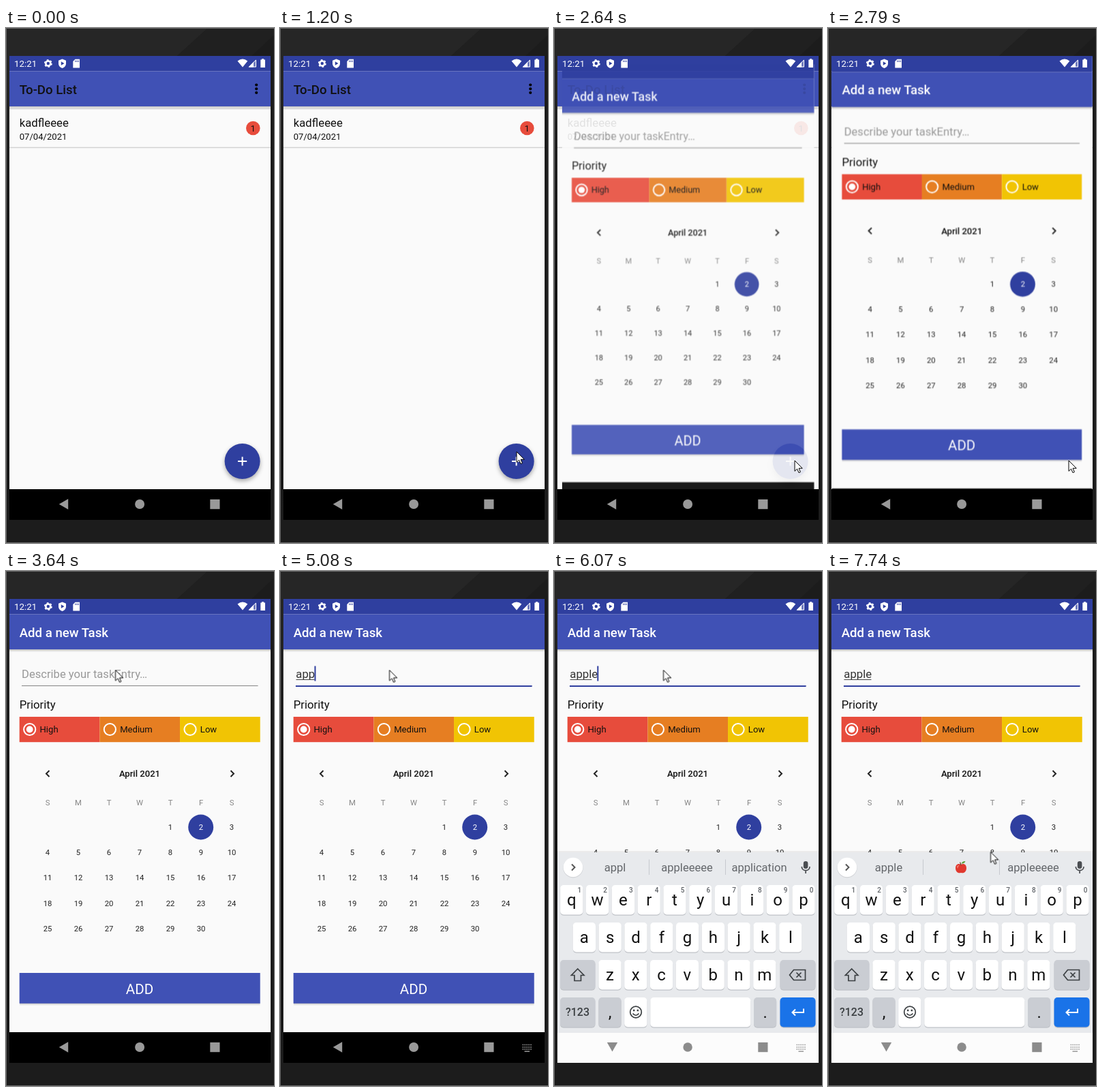
These frames come from a looping animation (393x756 px, 7990 ms). An HTML page:

```html
<!DOCTYPE html>
<html lang="en">
<head>
<meta charset="utf-8">
<title>To-Do List</title>
<style>
html, body { margin: 0; width: 100%; height: 100%; overflow: hidden; background: #1c1c1c; }
svg { display: block; width: 100vw; height: 100vh; }
text { font-family: Roboto, "Noto Sans", sans-serif; font-size: 16.75px; fill: #111; white-space: pre; }
.title { font-size: 18.64px; font-weight: 500; }
.small { font-size: 13.1px; }
.mid { text-anchor: middle; }
.white { fill: #fff; }
.day text { font-size: 11.3px; fill: #222; text-anchor: middle; }
.day .week { fill: #858585; }
.day .picked { fill: #fff; }
.sug text { font-size: 16.5px; fill: #63666a; text-anchor: middle; }
.key text { font-size: 24px; text-anchor: middle; }
.key .num { font-size: 10px; font-weight: 500; fill: #5f6368; }
.line { fill: none; stroke: #222; stroke-width: 2; }

/* one shared clock, hard steps */
.go { animation: 7.99s step-end infinite; }
#mouse { animation-name: mouse; }
#fab { animation-name: fab; }
#fabShade { animation-name: shade; }
#page { animation-name: page; transform-origin: 196.5px 381.5px; }
#focus { animation-name: focus; }
#hint { animation-name: hint; }
#kbdIcon { animation-name: icon; }
#edge { animation-name: edge; }
#caret { animation-name: caret; }
#under { animation-name: under; transform-origin: 23.5px 0; }
#board { animation-name: board; }
#sugA { animation-name: sugA; }
#sugB { animation-name: sugB; }

@keyframes mouse {
  0% { transform: translate(380px, -40px); }
  3.25% { transform: translate(380px, 17px); }
  4.93% { transform: translate(340px, 80px); }
  6.62% { transform: translate(303px, 170px); }
  8.29% { transform: translate(281px, 270px); }
  9.97% { transform: translate(285px, 375px); }
  11.65% { transform: translate(307px, 475px); }
  13.34% { transform: translate(333px, 565px); }
  15.01% { transform: translate(347px, 622px); }
  16.89% { transform: translate(353px, 635px); }
  36.79% { transform: translate(345px, 600px); }
  38.54% { transform: translate(300px, 480px); }
  40.3% { transform: translate(242px, 330px); }
  42.05% { transform: translate(195px, 220px); }
  43.8% { transform: translate(168px, 160px); }
  45.55% { transform: translate(160.5px, 145.5px); }
  83.22% { transform: translate(163px, 152px); }
  84.9% { transform: translate(174px, 185px); }
  86.59% { transform: translate(190px, 235px); }
  88.27% { transform: translate(207px, 290px); }
  89.95% { transform: translate(222px, 345px); }
  91.62% { transform: translate(231px, 385px); }
  93.31% { transform: translate(235px, 406px); }
  94.99% { transform: translate(236px, 412px); }
  96.87%, 100% { transform: translate(238.5px, 412.5px); }
}
@keyframes fab {
  0% { fill: #2f3f9f; }
  20.4% { fill: #3d4ca5; }
  21.9% { fill: #4a58ac; }
  29.66%, 100% { fill: #2f3f9f; }
}
@keyframes shade {
  0% { filter: drop-shadow(0 3px 3px #0005); }
  20.4% { filter: drop-shadow(0 5px 4px #0005); }
  21.9%, 100% { filter: drop-shadow(0 6px 5px #0005); }
}
@keyframes page {
  0% { opacity: 0; transform: scale(.9); }
  33.04% { opacity: .9; transform: scale(.965); }
  34.91% { opacity: 1; transform: scale(.9965); }
  36.79%, 100% { opacity: 1; transform: none; }
}
@keyframes focus { 0% { opacity: 0; } 52.81%, 100% { opacity: 1; } }
@keyframes hint { 0% { opacity: 1; } 60.07%, 100% { opacity: 0; } }
@keyframes icon { 0% { opacity: 0; } 58.32%, 100% { opacity: 1; } }
@keyframes edge {
  0% { transform: translateX(24px); }
  60.07% { transform: translateX(32.7px); }
  61.7% { transform: translateX(42.1px); }
  63.57% { transform: translateX(51.5px); }
  66.95% { transform: translateX(55.7px); }
  75.97%, 100% { transform: translateX(64.3px); }
}
@keyframes caret {
  0% { opacity: 0; }
  52.81% { opacity: 1; }
  83.22% { opacity: 0; }
  89.95% { opacity: 1; }
  96.87%, 100% { opacity: 0; }
}
@keyframes under {
  0% { transform: scaleX(0); }
  60.07% { transform: scaleX(.22); }
  61.7% { transform: scaleX(.45); }
  63.57% { transform: scaleX(.68); }
  66.95% { transform: scaleX(.8); }
  77.84%, 100% { transform: none; }
}
@keyframes board {
  0% { transform: translateY(312px); }
  65.33% { transform: translateY(180px); }
  66.95% { transform: translateY(60px); }
  68.58% { transform: translateY(12px); }
  70.33%, 100% { transform: none; }
}
@keyframes sugA { 0% { opacity: 1; } 77.84%, 100% { opacity: 0; } }
@keyframes sugB { 0% { opacity: 0; } 77.84%, 100% { opacity: 1; } }
</style>
</head>
<body>
<svg viewBox="0 0 393 756">
  <defs>
    <clipPath id="screen"><path d="M5 41H388V722H5Z"/></clipPath>
    <linearGradient id="fade" x2="0" y2="1">
      <stop stop-color="#000" stop-opacity=".24"/><stop offset="1" stop-color="#000" stop-opacity="0"/>
    </linearGradient>
    <linearGradient id="side" x2="0" y2="1">
      <stop stop-color="#262626"/><stop offset=".6" stop-color="#101010"/><stop offset="1" stop-color="#1c1c1c"/>
    </linearGradient>
    <g id="bars">
      <path fill="#2f3f9f" d="M5 41H388V63.5H5Z"/>
      <path fill="#4051b5" d="M5 63.5H388V115H5Z"/>
      <path fill="url(#fade)" d="M5 115H388V119H5Z"/>
    </g>
    <g id="dots">
      <path d="M355.500 695.500H369M355.500 699H369M355.500 702H369" stroke="#999" stroke-width="1.700" stroke-dasharray="1.700 1.200"/>
      <path d="M358.500 705.200H366" stroke="#999" stroke-width="1.500"/>
    </g>
  </defs>

  <!-- emulator frame -->
  <path fill="#1c1c1c" d="M0 0H393V756H0Z"/>
  <path fill="#262626" d="M0 0H296L251 41H0Z"/>
  <path fill="#202020" d="M296 0H393V10L360 41H251Z"/>
  <path fill="url(#side)" d="M0 41H5V722H0Z"/>
  <path fill="none" stroke="#666" d="M.5 756V.5H393M0 755.500H393"/>

  <g clip-path="url(#screen)">
    <!-- task list -->
    <path fill="#fafafa" d="M5 41H388V677H5Z"/>
    <use href="#bars"/>
    <path d="M5 118.500H388M5 175.500H388" stroke="#d2d2d2" stroke-width="1.300"/>
    <text class="title" x="19.700" y="96.500">To-Do List</text>
    <g><circle cx="367.200" cy="83.500" r="2.100"/><circle cx="367.200" cy="89.300" r="2.100"/><circle cx="367.200" cy="95" r="2.100"/></g>
    <text x="19.700" y="145">kadfleeee</text>
    <text class="small" x="19.700" y="163.500">07/04/2021</text>
    <circle cx="362.300" cy="147" r="10.300" fill="#e74c3c"/>
    <text class="small mid" x="362.300" y="151.700">1</text>
    <g id="fabShade" class="go"><circle id="fab" class="go" cx="346.600" cy="636" r="26"/></g>
    <path d="M340 636H353.200M346.600 629.400V642.600" stroke="#fff" stroke-width="2"/>
    <path d="M5 677H388V722H5Z"/>

    <!-- new task -->
    <g id="page" class="go">
      <path fill="#fafafa" d="M5 41H388V677H5Z"/>
      <use href="#bars"/>
      <path d="M5 677H388V722H5Z"/>
      <text class="title white" x="19.700" y="96.500">Add a new Task</text>
      <path d="M23 168.500H369.500" stroke="#858585"/>
      <text x="23.300" y="157" style="fill:#333">apple</text>
      <path id="under" class="go" d="M23.500 159.500H63.500" stroke="#444"/>
      <g id="edge" class="go">
        <path fill="#fafafa" d="M0 138H50V162H0Z"/>
        <path id="caret" class="go" fill="#303f9f" d="M-1 139.500H1V161.500H-1Z"/>
      </g>
      <path id="focus" class="go" fill="#303f9f" d="M23 168H369.500V170H23Z"/>
      <text id="hint" class="go" x="23" y="157" style="fill:#999;font-size:16.600px">Describe your taskEntry…</text>
      <text x="19.700" y="202">Priority</text>
      <g id="radios"></g>
      <path class="line" d="M63.500 293L59 297.500L63.500 302M329.500 293L334 297.500L329.500 302"/>
      <text class="small mid" x="196" y="302" font-weight="500">April 2021</text>
      <g id="days" class="day"></g>
      <path fill="url(#fade)" d="M20 634H372.500V638H20Z"/>
      <path fill="#4051b5" d="M19.700 590H372.700V634.700H19.700Z"/>
      <text class="mid white" x="196" y="621" style="font-size:20.500px">ADD</text>
    </g>

    <!-- system bars -->
    <g fill="#fff">
      <text class="white" x="12" y="56.800" style="font-size:13.300px">12:21</text>
      <g fill="none" stroke="#fff">
        <circle cx="61.800" cy="52" r="3.500" stroke-width="2.600"/>
        <circle cx="61.800" cy="52" r="4.900" stroke-width="2.200" stroke-dasharray="2.500 2.630"/>
      </g>
      <path d="M82.500 45.500L88 47.700V52C88 55.500 85.600 58 82.500 59C79.400 58 77 55.500 77 52V47.700Z"/>
      <path fill="#2f3f9f" d="M80.800 49.200L85.500 52L80.800 54.800Z"/>
      <path d="M101.500 45.800H108V58.500H98.300V49Z"/>
      <path stroke="#2f3f9f" d="M101.800 47.500V50M104 47.500V50M106.200 47.500V50"/>
      <path d="M339.500 48.500Q347 42.500 354.300 48.500L347 57.500Z"/>
      <path fill-opacity=".3" d="M367 46V57.500H355.500Z"/>
      <path d="M363 50V57.500H355.500Z"/>
      <path fill="none" stroke="#fff" d="M366.500 47V57H356.700Z"/>
      <path d="M373.300 46.500H375V45.200H378.200V46.500H380V58H373.300Z"/>
    </g>
    <g fill="#999">
      <path d="M77.800 699L91.200 691.200V706.800Z"/>
      <circle cx="196.100" cy="699" r="7"/>
      <path d="M299.300 692H313.500V706.200H299.300Z"/>
      <use id="kbdIcon" class="go" href="#dots"/>
    </g>

    <!-- keyboard -->
    <g id="board" class="go">
      <path fill="#000" fill-opacity=".06" d="M5 411H388V413H5Z"/>
      <path fill="#e8eaed" d="M5 413H388V678H5Z"/>
      <path fill="#fcfcfc" d="M5 678H388V722H5Z"/>
      <g fill="#8c8c8c">
        <path d="M77.800 692H93.200L85.500 705.500Z"/>
        <circle cx="196.100" cy="699" r="6.700"/>
        <path d="M299.300 692H313.500V706.200H299.300Z"/>
      </g>
      <use href="#dots"/>
      <circle cx="28" cy="435.800" r="14.600" fill="#cfd1d5"/>
      <circle cx="28" cy="435" r="14.300" fill="#fff"/>
      <path class="line" d="M26 430.500L30.500 435L26 439.500" style="stroke:#555"/>
      <path d="M139.500 423.500V446M251.500 423.500V446" stroke="#c6c9ce"/>
      <g class="sug">
        <g id="sugA" class="go">
          <text x="89.500" y="441">appl</text><text x="195" y="441">appleeeee</text><text x="301" y="441">application</text>
        </g>
        <g id="sugB" class="go">
          <text x="89" y="441">apple</text><text x="301" y="441">appleeeee</text>
          <path fill="#e0392f" d="M195 431C191 428.500 187 431 187 436C187 441 190.500 444.500 195 443C199.500 444.500 203 441 203 436C203 431 199 428.500 195 431Z"/>
          <path fill="#f4877c" d="M189 434Q190 431.500 192.500 432Q190.500 434 190 437Z"/>
          <path fill="none" stroke="#6b4226" stroke-width="1.300" d="M195 432Q194.500 429 193.500 427.500"/>
          <path fill="#5ea33a" d="M195.500 429.500Q197 425.500 201.500 426Q200 430 195.500 429.500Z"/>
        </g>
      </g>
      <g class="line" style="stroke:#4a4d51">
        <rect x="366.800" y="427" width="4.600" height="9" rx="2.300" fill="#4a4d51"/>
        <path d="M363.300 434C363.300 441.500 375 441.500 375 434M369.100 440V444" stroke-width="1.700"/>
      </g>
      <g id="keys" class="key"></g>
      <g class="line" style="stroke:#3c4043;stroke-width:1.700">
        <path d="M34.800 584L44 593.500H39.500V601.500H30V593.500H25.500Z"/>
        <path d="M351.500 585.500H368.500V600.500H351.500L345.500 593ZM355.500 589.500L362.500 596.500M362.500 589.500L355.500 596.500"/>
        <circle cx="120" cy="647.500" r="8.300"/>
        <path d="M115.500 649.500Q120 655 124.500 649.500"/>
        <path stroke-width="2.400" d="M116 645H118.400M121.600 645H124"/>
        <path stroke="#fff" stroke-width="2" d="M366 642.500V648H350M354 643.500L349.500 648L354 652.500"/>
      </g>
    </g>
  </g>

  <path id="mouse" class="go" fill="#fff" stroke="#000" d="M0 0V15.500L3.600 12.200L6 17.800L8.400 16.800L6.100 11.300H11.200Z"/>
</svg>
<script>
const NS = 'http://www.w3.org/2000/svg';

function add(parent, tag, attrs, text) {
  const el = document.createElementNS(NS, tag);
  for (const name in attrs) el.setAttribute(name, attrs[name]);
  if (text) el.textContent = text;
  parent.append(el);
  return el;
}

const byId = id => document.getElementById(id);

// priority choices
[['High', '#e74c3c'], ['Medium', '#e67e22'], ['Low', '#f1c404']].forEach(([name, fill], i) => {
  const g = byId('radios'), x = 19.7 + i * 117.67;
  add(g, 'rect', { x, y: 214, width: 117.67, height: 37.2, fill });
  add(g, 'circle', { cx: x + 15, cy: 232.5, r: 8.6, fill: 'none', stroke: '#fff', 'stroke-width': 2 });
  if (!i) add(g, 'circle', { cx: x + 15, cy: 232.5, r: 4.9, fill: '#fff' });
  add(g, 'text', { x: x + 29.8, y: 237.2, class: 'small' }, name);
});

// calendar: the month begins on a Thursday
const days = byId('days'), colX = i => 61 + i * 45;
[...'SMTWTFS'].forEach((d, i) => add(days, 'text', { x: colX(i), y: 344.3, class: 'week' }, d));
add(days, 'circle', { cx: colX(5) - 0.3, cy: 376, r: 18.5, fill: '#2f3f9f' });
for (let d = 1; d <= 30; d++) {
  const cell = d + 3, y = 380 + Math.floor(cell / 7) * 37.2;
  add(days, 'text', { x: colX(cell % 7), y, class: d === 2 ? 'picked' : '' }, d);
}

// keyboard
const keys = byId('keys'), GREY = '#cacdd3', PITCH = 37.8;

function key(x, y, width, fill) {
  const box = { x, width, height: 43.5, rx: 5 };
  add(keys, 'rect', { ...box, y: y + 1.2, fill: '#bfc2c7' });
  add(keys, 'rect', { ...box, y, fill });
}

[['qwertyuiop', 25.8, 461], ['asdfghjkl', 44.4, 516], ['zxcvbnm', 82, 571]].forEach(([row, x0, y], r) => {
  [...row].forEach((letter, i) => {
    const x = x0 + i * PITCH;
    key(x - 16.6, y, 33.2, '#fff');
    add(keys, 'text', { x, y: y + 29.5 }, letter);
    if (!r) add(keys, 'text', { x: x + 11.5, y: y + 11, class: 'num' }, String((i + 1) % 10));
  });
});
key(9, 571, 51.5, GREY);
key(331.5, 571, 52, GREY);
key(9, 626, 51.5, GREY);
key(65.4, 626, 33.2, GREY);
key(103.2, 626, 33.2, '#fff');
key(141.3, 626, 147, '#fff');
key(293, 626, 33.2, GREY);
key(331.5, 626, 52, '#1a73e8');
add(keys, 'text', { x: 34.5, y: 653, style: 'font-size:16px;font-weight:500;fill:#3c4043' }, '?123');
add(keys, 'text', { x: 82, y: 656 }, ',');
add(keys, 'text', { x: 309.6, y: 656 }, '.');
</script>
</body>
</html>
```
